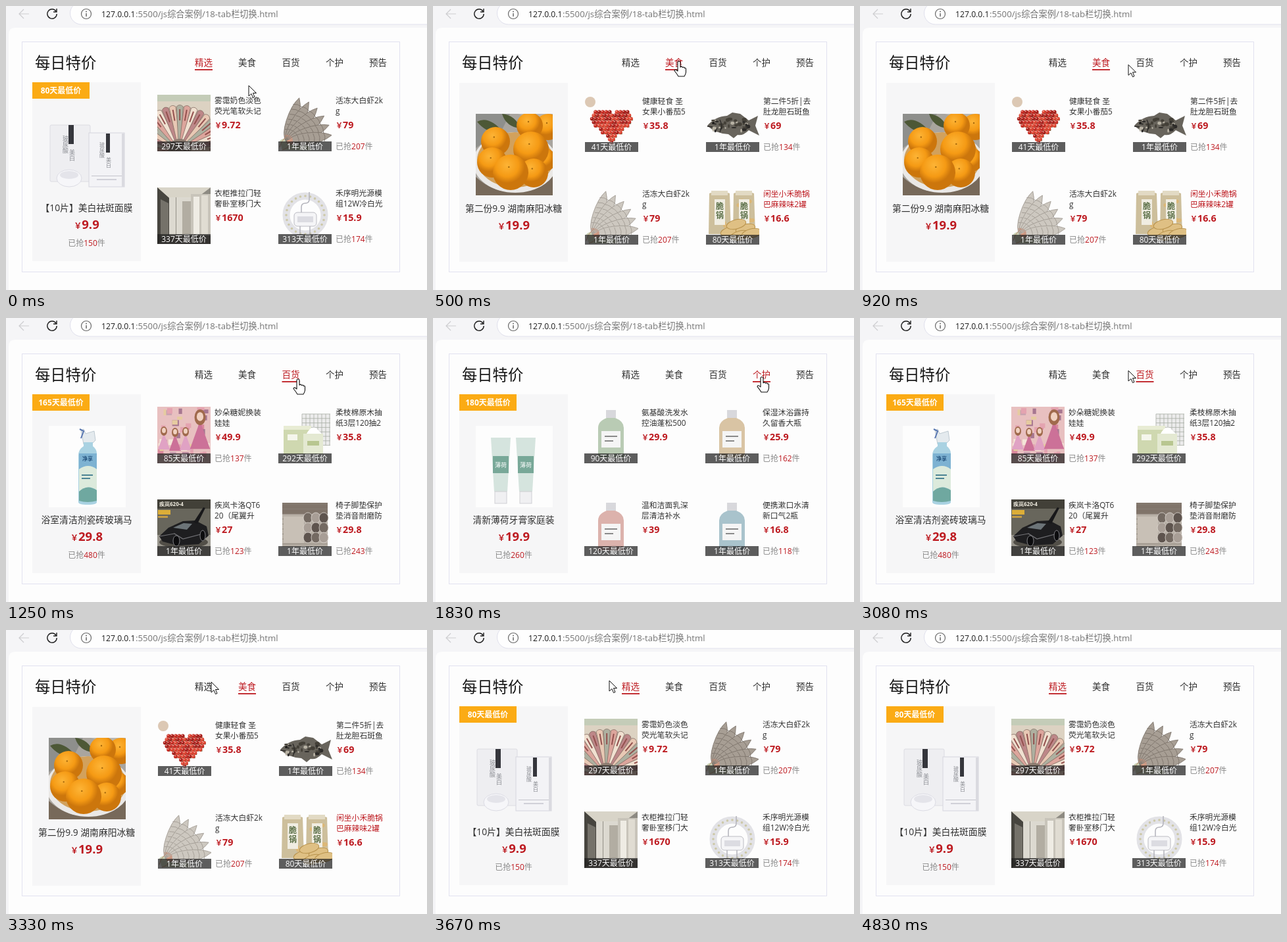
Write an HTML page that moves like this. It is 640 px wide and 432 px high and loops after 4910 ms.

```html
<!DOCTYPE html>
<html lang="zh-CN">
<head>
<meta charset="utf-8">
<title>每日特价</title>
<style>
html, body { margin: 0; width: 100%; height: 100%; overflow: hidden; background: #fdfdfd; }
#stage { display: block; width: 640px; height: 432px; font-family: "Open Sans", "Noto Sans CJK SC", sans-serif; }
</style>
</head>
<body>
<svg id="stage" viewBox="0 0 640 432" xmlns="http://www.w3.org/2000/svg"></svg>
<script>
const RED = '#bd1a20', DARK = '#303030', GRAY = '#8a8a8a', PAPER = '#fdfdfd';
const LOOP = 4910, STEP = 250 / 3;

const rect = (x, y, w, h, fill, more = '') => `<rect x="${x}" y="${y}" width="${w}" height="${h}" fill="${fill}" ${more}/>`;
const oval = (x, y, rx, ry, fill, more = '') => `<ellipse cx="${x}" cy="${y}" rx="${rx}" ry="${ry}" fill="${fill}" ${more}/>`;
const dot = (x, y, r, fill, more) => oval(x, y, r, r, fill, more);
const path = (d, fill, more = '') => `<path d="${d}" fill="${fill}" ${more}/>`;
const line = (d, color, w = 1) => path(d, 'none', `stroke="${color}" stroke-width="${w}"`);
const text = (x, y, s, size, fill, more = '') => `<text x="${x}" y="${y}" font-size="${size}" fill="${fill}" ${more}>${s}</text>`;
const mid = 'text-anchor="middle"', bold = 'font-weight="700"';
const times = (n, f) => Array.from({ length: n }, (_, i) => f(i)).join('');
const turn = (a, x, y) => `transform="rotate(${a} ${x} ${y})"`;
const small = () => rect(0, 0, 81, 86, PAPER);
const large = () => rect(0, 0, 117, 124, PAPER);

let seed = 7;
const rnd = () => (seed = seed * 16807 % 2147483647) / 2147483647;
const pick = list => list[Math.floor(rnd() * list.length)];

/* Large pictures, 117 x 124 */
const upright = (x, y, s, size) => [...s].map((c, i) => text(x, y + i * size, c, size, '#8b8d93')).join('');
const masks = () =>
  rect(2, 17, 61, 86, '#eeeef1', 'rx="2" stroke="#dcdce2"') + rect(30, 17, 8, 29, '#35363c') +
  upright(21, 41, '玻尿酸', 9) + upright(31, 62, '美白', 9) +
  rect(61, 29, 54, 82, '#f3f3f6', 'stroke="#d6d6de"') + rect(111, 30, 4, 81, '#dadae0') +
  rect(87, 30, 6, 29, '#35363c') + upright(77, 50, '玻尿酸', 8) + upright(87, 73, '美白', 8) +
  rect(65, 94, 46, 1, '#c4c4cc') + rect(73, 99, 30, 2, '#d0d0d8') +
  oval(31, 98, 19, 13, '#f6f6f9', 'stroke="#dcdce4"') + oval(31, 93, 14, 6, '#e4e4ea');

const fruit = () => rect(0, 0, 117, 124, '#a9a59f') +
  path('M0 0H52L40 24 0 52Z', '#8e8f8c') + path('M64 0H117V10L88 8Z', '#b9b6b0') +
  path('M2 12Q20 2 42 28 18 32 2 12ZM40 0Q60 2 68 22 46 20 40 0Z', '#4d5836') +
  path('M0 124V96Q28 122 66 119 104 114 117 88V124Z', '#77695a') +
  oval(60, 74, 64, 46, '#eae8e6') + oval(60, 70, 58, 42, '#d2a15c') +
  [[110, 20, 20], [82, 18, 20], [30, 42, 22], [104, 70, 18], [84, 54, 27], [25, 74, 23], [88, 90, 22], [53, 89, 27]]
    .map(([x, y, r]) => dot(x, y, r, 'url(#orange)') + dot(x - r * .1, y - r * .3, 1.2, '#a5680c')).join('');

const spray = () => large() +
  path('M49 7L53 5 56 12 69 8 71 22 65 28H53L51 17Z', '#e4eaee', 'stroke="#b2bfc8" stroke-width=".8"') +
  line('M47 5L53 8 49 19', '#5876b0', 2) +
  path('M53 25H67V31Q74 36 73 45V116Q73 120 59 120T45 116V45Q45 36 53 31Z', '#a9d2e2') +
  rect(46, 42, 27, 26, '#7db2d2') + path('M46 66Q60 56 73 66V98Q60 88 46 100Z', '#dceadc') +
  path('M46 100Q58 88 73 98V114Q59 118 46 114Z', '#6fa8a0') +
  text(59, 53, '净享', 8, '#22507c', mid + ' ' + bold) + rect(50, 74, 17, 2, '#4c8494') + rect(50, 79, 13, 2, '#4c8494');

const wine = () => large() + [46, 71].map(x =>
  path(`M${x - 5} 2h10v32q5 7 5 16v69q0 3 -10 3t-10 -3v-69q0-9 5-16Z`, '#1d1214') +
  rect(x - 5, 2, 10, 24, '#2c1a1c') + rect(x - 5, 25, 10, 2, '#8c7862') +
  rect(x - 9, 60, 18, 50, '#5d4840') + rect(x - 9, 60, 18, 2, '#a58c70') + dot(x, 70, 4, '#8f775c') +
  rect(x - 6, 80, 12, 2, '#b59c7c') + rect(x - 6, 85, 12, 1, '#b59c7c') + rect(x - 9, 102, 18, 3, '#8a7054')).join('');

const tube = () => large() + [38, 76].map(x =>
  path(`M${x - 15} 18H${x + 15}L${x + 10} 100H${x - 10}Z`, '#d5e4de') + rect(x - 12, 46, 24, 26, '#78a898') +
  text(x, 63, '薄荷', 9, '#fff', mid) + rect(x - 9, 100, 18, 18, '#f0f0f2', 'stroke="#cfcfd4"')).join('');

/* Small pictures, 81 x 86 */
const pens = () => rect(0, 0, 81, 86, '#dcd2c2') + rect(0, 0, 81, 10, '#c4ccb8') +
  times(19, i => {
    const c = ['#dca59c', '#f0e0d0', '#bd8788', '#e8c8b4', '#aeb0a0'][i % 5];
    return `<g ${turn(-88 + i * 9.8, 34, 84)}>` + path('M32.5 84L29 18Q34 13 39 18L35.5 84Z', c, 'stroke="#806a60" stroke-width=".7"') +
      rect(33, 22, 2, 17, '#94504e') + '</g>';
  }) + dot(34, 84, 17, '#8c7c70');

const shrimp = (body, edge) => () => small() + path('M2 70Q14 60 40 72L52 84H6Z', '#c9d2b4') +
  times(6, i => `<g transform="rotate(${-72 + i * 13} 12 72)">` +
    path('M12 72Q20 62 44 62T82 70Q66 80 42 80T12 72Z', body, `stroke="${edge}" stroke-width=".8"`) +
    times(6, j => line(`M${30 + j * 8} 64q3 7 0 14`, edge, .8)) + path('M12 72L22 66V77Z', '#c99884') + '</g>') +
  line('M14 62Q4 70 2 80M22 72Q14 82 6 84', '#c08a70') + dot(16, 72, 3, '#dd9c80');

const wardrobe = () => rect(0, 0, 81, 86, '#8d8a82') + path('M0 0H81L60 16H18Z', '#d8d4c8') +
  path('M0 0L18 16V86H0Z', '#47453f') + path('M5 18L17 24V72L5 78Z', '#75726a') +
  rect(18, 15, 33, 58, '#dcd9d0') + rect(28, 15, 1, 58, '#949088') + rect(38, 21, 13, 50, '#b2ada2') +
  rect(51, 10, 30, 64, '#c8c4ba') + rect(55, 14, 9, 58, '#efece4') + rect(67, 12, 10, 60, '#e0dcd2') +
  path('M18 73H81V86H0Z', '#67635a');

const lamp = () => small() + dot(41, 42, 29, 'none', 'stroke="#e2e2e6" stroke-width="11"') +
  times(24, i => dot(41 + 29 * Math.cos(i * Math.PI / 12), 42 + 29 * Math.sin(i * Math.PI / 12), 1.8, '#cdc9a8')) +
  rect(24, 38, 34, 21, '#f5f5f7', 'rx="5" stroke="#bbbbc2"') + rect(29, 44, 24, 9, '#dcdce2') +
  line('M35 38V30Q35 24 41 24T47 18V7M33 59V72M48 59V72', '#b2b2ba', 1.5);

const inHeart = (u, v) => Math.hypot(u - .47, v - .4) < .53 || (v < .35 && u < (v + 1) * .74);
const heart = () => {
  let s = small() + dot(8, 10, 8, '#dcc8b4');
  for (let r = 0; r < 11; r++) for (let c = 0; c < 13; c++) {
    const x = 8 + c * 5.4 + r % 2 * 2.7, y = 20 + r * 5.2;
    if (inHeart(Math.abs(x - 41) / 32, (46 - y) / 27))
      s += dot(x, y, 2.9, pick(['#c62a22', '#dc4432', '#a81f1c'])) + dot(x - .8, y - 1, .9, '#f4b4a4') + dot(x + 2, y + 2, .8, '#5c5a34');
  }
  return s;
};

const fish = () => small() +
  path('M2 46Q14 32 32 31L40 26 52 28 65 38 79 31 75 46 81 61 65 53Q56 62 48 60L42 65 34 59Q14 58 2 46Z', '#68645c') +
  times(38, () => { const x = 10 + rnd() * 54; return oval(x, 36 + rnd() * 18, 1 + rnd() * 3, 1 + rnd() * 2, pick(['#2c2a28', '#b8b2a4', '#444038'])); }) +
  dot(11, 42, 2, '#1c1a18') + line('M2 47L10 48M21 37Q26 46 21 56', '#2c2a28', 1.4);

const crisps = () => small() + [5, 42].map(x =>
  path(`M${x} 8Q${x + 15} 1 ${x + 31} 8L${x + 33} 70H${x - 1}Z`, '#cdbf9c') + rect(x + 3, 4, 25, 7, '#e2dac4') +
  times(8, () => oval(x + 3 + rnd() * 26, 16 + rnd() * 42, 4, 3, '#dcb878')) +
  rect(x + 8, 17, 16, 39, '#f0ede2') + text(x + 16, 32, '脆', 12, '#5c7048', mid + ' ' + bold) + text(x + 16, 46, '锅', 12, '#5c7048', mid + ' ' + bold)).join('') +
  [[37, 66], [60, 62], [52, 72], [69, 69], [46, 55]].map(([x, y]) => oval(x, y, 15, 7, '#dfc084', `stroke="#b8924c" ${turn(-14, x, y)}`)).join('');

const dolls = () => rect(0, 0, 81, 86, '#e8c0c0') +
  times(42, () => rect(rnd() * 76, rnd() * 80, 4 + rnd() * 7, 3 + rnd() * 7, pick(['#d9879c', '#f4e5d8', '#c8a2b0', '#e4a3b0', '#a77790', '#e6cba0']))) +
  [[10, 36], [27, 38], [43, 37], [65, 15]].map(([x, y], i) => {
    const k = i === 3 ? 1.7 : 1;
    return path(`M${x} ${y + 4 * k}L${x + 9 * k} ${y + 29 * k}H${x - 9 * k}Z`, i % 2 ? '#cc7198' : '#e0a2c4') + oval(x, y + 1, 5 * k, 7 * k, '#a06a4c') + oval(x, y, 3 * k, 4 * k, '#f0d1c0');
  }).join('');

const tissue = () => small() + rect(36, 11, 43, 48, '#ececec') +
  times(8, i => line(`M${36 + i * 6} 11V59M36 ${11 + i * 6.8}H79`, '#a8aca4', .8)) +
  rect(8, 29, 42, 43, '#cfd8b0') + rect(8, 29, 42, 6, '#e8ecd4') + rect(14, 42, 15, 9, '#f5f6ec') +
  rect(38, 41, 30, 31, '#e4e9d2') + path('M43 41Q50 28 58 33L66 41Z', '#fff') + rect(44, 52, 18, 7, '#b8c690');

const car = () => rect(0, 0, 81, 86, '#68665c') + rect(0, 0, 81, 14, '#424038') +
  text(3, 10, '疾岚620-4', 8, '#f0ece0', bold) + rect(1, 16, 19, 7, '#dcae38') + rect(1, 25, 15, 3, '#c49c44') +
  rect(0, 54, 81, 32, '#98958c') + oval(40, 65, 37, 9, '#524f48') +
  path('M3 56L17 43 39 33 58 32 75 41 78 55 63 68 31 70 8 64Z', '#1e1e20') + path('M24 43L40 36 53 37 45 46Z', '#6c7478') +
  path('M55 35L70 12 73 13 61 37Z', '#18181a') + line('M4 56L26 52 39 60 70 52', '#747478', 1.2) +
  oval(29, 63, 5, 8, '#0c0c0e', 'stroke="#808084"') + oval(69, 55, 4, 8, '#0c0c0e', 'stroke="#808084"');

const pads = () => small() + rect(6, 5, 69, 67, '#b8b0a6') + rect(6, 5, 69, 17, '#80746a') +
  times(9, i => line(`M6 ${7 + i * 7.6}H75`, '#8a8078', .8)) + rect(8, 26, 31, 40, '#c8c0b6') +
  times(3, r => times(3, c => oval(45 + c * 12, 28 + r * 15, 7, 8, ['#746a62', '#a89e96', '#5e544e'][(r + c) % 3], 'stroke="#dfd9d2" stroke-width=".8"')));

const drone = () => small() + oval(40, 26, 37, 20, '#cfe6f4', 'stroke="#2b7fc0" stroke-width="2"') +
  times(9, i => line(`M40 26L${40 + 36 * Math.cos(i * .7)} ${26 + 19 * Math.sin(i * .7)}`, '#4b9cd4', 1.5)) +
  [[20, 18], [60, 18], [20, 34], [60, 34]].map(([x, y]) => oval(x, y, 14, 8, '#8cc4e8', 'stroke="#2474b4" stroke-width="2"') + line(`M${x - 13} ${y}H${x + 13}`, '#1c4c78')).join('') +
  oval(40, 26, 10, 8, '#2c88c8') + oval(40, 24, 6, 4, '#8cd0f4') + line('M6 36Q40 62 74 36M8 34Q40 52 72 34', '#2b7fc0', 1.5) +
  path('M0 72L18 67Q31 60 38 64L64 68Q70 72 60 72L42 72 67 76Q64 80 40 82L15 84 0 86Z', '#dcb0a0') + line('M21 70L45 72', '#b4826c');

const cognac = () => small() + path('M1 17L25 13 26 73 2 76Z', '#cda054') + path('M25 13H79L81 74H26Z', '#dcb46c') +
  rect(6, 25, 14, 42, '#b58440') + path('M62 17L79 14V72L62 70Z', '#b98844') +
  rect(47, 14, 9, 19, '#b07430') + path('M47 30Q28 38 28 54T38 72H65Q76 65 75 50T56 30Z', '#9c3f1c') +
  oval(51, 51, 13, 11, '#dcb474') + oval(51, 51, 9, 7, '#b83c24') + rect(44, 50, 14, 2, '#f0d49c') +
  path('M57 66H76L73 79H60Z', '#efe6d4', 'stroke="#b49d7c"') + rect(60, 71, 13, 7, '#c88838');

const watch = () => rect(0, 0, 81, 86, '#a3a3a6') + path('M0 0H81V36L36 9 0 32Z', '#68686c') + path('M0 30L55 86H0Z', '#5c5c60') +
  path('M0 44L24 24 64 73 50 86H37Z', '#c8a694') +
  path('M17 68L31 30 45 10 66 19 72 56 52 70 35 86Z', '#242426') + dot(44, 39, 25, '#141416', 'stroke="#505054" stroke-width="2"') +
  dot(44, 39, 19, '#24484e') + path('M30 52L56 25 63 35 43 58Z', '#7cb4b8') + path('M29 50L48 36 34 57Z', '#d47840') + rect(68, 34, 4, 8, '#404044');

const brandy = () => small() + rect(5, 10, 37, 69, '#caa05c') + rect(5, 10, 32, 69, '#262220') +
  rect(9, 38, 25, 30, '#cca45c') + rect(13, 44, 17, 2, '#6b4e24') + rect(13, 50, 17, 7, '#e4cc94') + dot(21, 25, 6, '#a08048') +
  rect(56, 7, 11, 11, '#342420') + rect(57, 18, 9, 20, '#b06c30') + path('M57 36Q44 47 42 76Q43 82 60 81T77 75Q75 47 66 36Z', '#903c18') +
  path('M50 51H70L73 69H47Z', '#d8ac68') + text(60, 64, 'XO', 9, '#5c2c14', mid + ' ' + bold);

const care = color => () => small() + rect(33, 5, 15, 12, '#d8d8dc') +
  path('M34 17H47Q60 22 60 32V78H21V32Q21 22 34 17Z', color) + rect(26, 37, 29, 25, '#f5f5f5') + rect(31, 44, 19, 2, GRAY) + rect(31, 51, 13, 2, GRAY);

/* item: picture, two title lines, price, strip, sold */
const tabs = [
  { name: '精选', x: 287, badge: '80天最低价', art: masks, title: '【10片】美白祛斑面膜', price: '9.9', sold: 150, items: [
    [pens, '雾霭奶色淡色', '荧光笔软头记', '9.72', '297天最低价'],
    [shrimp('#a79e94', '#7c736a'), '活冻大白虾2k', 'g', '79', '1年最低价', 207],
    [wardrobe, '衣柜推拉门轻', '奢卧室移门大', '1670', '337天最低价'],
    [lamp, '禾序明光源模', '组12W冷白光', '15.9', '313天最低价', 174]] },
  { name: '美食', x: 353, off: 1, art: fruit, title: '第二份9.9 湖南麻阳冰糖', price: '19.9', items: [
    [heart, '健康轻食 圣', '女果小番茄5', '35.8', '41天最低价'],
    [fish, '第二件5折|去', '肚龙胆石斑鱼', '69', '1年最低价', 134],
    [shrimp('#cdc8c0', '#a09a92'), '活冻大白虾2k', 'g', '79', '1年最低价', 207],
    [crisps, '闲坐小禾脆锅', '巴麻辣味2罐', '16.6', '80天最低价', 0, RED]] },
  { name: '百货', x: 419.5, badge: '165天最低价', art: spray, title: '浴室清洁剂瓷砖玻璃马', price: '29.8', sold: 480, items: [
    [dolls, '妙朵糖妮换装', '娃娃', '49.9', '85天最低价', 137],
    [tissue, '柔枝棉原木抽', '纸3层120抽2', '35.8', '292天最低价'],
    [car, '疾岚卡洛QT6', '20（尾翼升', '27', '1年最低价', 123],
    [pads, '椅子脚垫保护', '垫消音耐磨防', '29.8', '1年最低价', 243]] },
  { name: '个护', x: 486, badge: '180天最低价', art: tube, title: '清新薄荷牙膏家庭装', price: '19.9', sold: 260, items: [
    [care('#b9cbb4'), '氨基酸洗发水', '控油蓬松500', '29.9', '90天最低价'],
    [care('#d9c4a4'), '保湿沐浴露持', '久留香大瓶', '25.9', '1年最低价', 162],
    [care('#dcb2ac'), '温和洁面乳深', '层清洁补水', '39', '120天最低价'],
    [care('#a9c3cc'), '便携漱口水清', '新口气2瓶', '16.8', '1年最低价', 118]] },
  { name: '预告', x: 552, art: wine, title: 'VORELINA白兰地6年/8', price: '208', items: [
    [drone, '感应飞行玩具', '四轴迷你飞机', '49.7'],
    [cognac, '买一瓶 送一', '瓶 罗曼珂伯', '79'],
    [watch, '智能手表男运', '动多功能计步', '98'],
    [brandy, '玉盏XO白兰', '地', '99']] }
];

const price = (x, y, n, size, yen, more = '') =>
  text(x, y, `<tspan font-size="${yen}">￥</tspan>${n}`, size, RED, bold + ' ' + more);
const soldLine = (x, y, n, more) => n ? text(x, y, `已抢<tspan fill="${RED}">${n}</tspan>件`, 12, GRAY, more) : '';
const picture = (x, y, w, h, art) => `<svg x="${x}" y="${y}" width="${w}" height="${h}">${art()}</svg>`;

function card([art, a, b, cost, strip, sold, color = DARK], i) {
  const x = 230 + i % 2 * 184, y = 135 + (i >> 1) * 141;
  return picture(x, y, 81, 86, art) +
    (strip ? rect(x, y + 71, 81, 15, '#202020', 'opacity=".72"') + text(x + 40.5, y + 83, strip, 12, '#fff', mid) : '') +
    text(x + 87, y + 13, a, 11.8, color) + text(x + 87, y + 29, b, 11.8, color) +
    price(x + 87, y + 51, cost, 14.3, 11) + soldLine(x + 87, y + 83, sold);
}

function page(tab) {
  const d = tab.off || 0;
  return `<g class="page" visibility="hidden">` +
    `<g transform="translate(0 ${d})">` + rect(40, 116, 165, 272, '#f6f6f7') +
    (tab.badge ? rect(40, 116, 87, 25, '#fbab14') + text(83.5, 133, tab.badge, 12, '#fff', mid + ' ' + bold) : '') +
    picture(65, 164 - d, 117, 124, tab.art) +
    text(122.5, 312, tab.title, 13.8, DARK, mid) + price(122.5, 339, tab.price, 18.5, 12, mid) + soldLine(122.5, 365, tab.sold, mid) + '</g>' +
    `<g transform="translate(${d} ${d})">${tab.items.map(card).join('')}</g>` +
    rect(tab.x, 96, 27, 1.8, RED) + text(tab.x, 91, tab.name, 13.5, RED) + '</g>';
}

const chrome =
  rect(0, 0, 640, 432, '#f5f5f7') + path('M4 432V43Q4 33 14 33H640V432Z', PAPER) +
  rect(97.5, -6, 600, 34, '#fefefe', 'rx="17" stroke="#e0e0ec"') +
  line('M35 12H20M27 5L20 12 27 19', '#cdcdd0', 1.2) +
  line('M76 8A7.2 7.2 0 1 0 77.2 12M77 4V9H72', '#202020', 1.4) +
  dot(122, 12, 7.5, 'none', 'stroke="#6a6a6a" stroke-width="1.2"') + rect(121.3, 11, 1.5, 5, '#6a6a6a') + dot(122, 8.5, 1, '#6a6a6a') +
  text(145, 17, '127.0.0.1', 12.2, '#1c1c1c') + text(197, 17, ':5500/js综合案例/18-tab栏切换.html', 13.2, '#747474') +
  rect(24.5, 54.5, 574, 350, 'none', 'stroke="#e2e2f0"') + text(44, 95, '每日特价', 23.3, '#141414');

const arrow = path('M0 0V16L4 12.5 6.6 18.5 9 17.4 6.5 11.5H11.5Z', '#fff', 'stroke="#111" stroke-width="1" id="arrow"');
const hand = path('M-2 2Q-2 0 0 0T2 2V9Q4 7 5.5 9.5 7.5 8 8.5 10.5 10.5 9.5 10.5 12V17Q10 20 8 23H-1Q-4 18 -7 14.5 -6 11 -2 15Z',
  '#fff', 'stroke="#111" stroke-width="1.1" stroke-linejoin="round" id="hand"');

const stage = document.getElementById('stage');
stage.innerHTML = '<defs><radialGradient id="orange" cx=".4" cy=".3"><stop offset="0" stop-color="#fdb436"/><stop offset=".65" stop-color="#f59a14"/><stop offset="1" stop-color="#cc760c"/></radialGradient></defs>' +
  chrome + tabs.map(t => `<g class="tab">${text(t.x, 91, t.name, 13.5, DARK)}</g>`).join('') +
  tabs.map(page).join('') + `<g id="pointer">${arrow}${hand}</g>`;

const all = s => [...stage.querySelectorAll(s)];
const pages = all('.page'), labels = all('.tab');
const [pointer, arrowEl, handEl] = ['#pointer', '#arrow', '#hand'].map(s => stage.querySelector(s));
const show = (el, on) => el.setAttribute('visibility', on ? 'visible' : 'hidden');

// step, tab
const switches = [[0, 0], [3, 1], [12, 2], [19, 3], [29, 4], [33, 3], [36, 2], [38, 1], [41, 0]];
// step, x, y, hand shape from here on
const track = [[0, 369, 121, 0], [3, 372, 96, 1], [6, 374, 84, 1], [9, 382, 86, 0], [12, 421, 91, 1],
  [15, 444, 93, 1], [17, 458, 92, 0], [19, 488, 91, 1], [24, 508, 89, 1], [26, 530, 87, 0], [28, 568, 86, 1], [30, 576, 86, 1],
  [31, 570, 85, 1], [32, 540, 84, 0], [33, 510, 83, 1], [35, 462, 82, 0], [36, 438, 81, 1], [37, 408, 80, 0], [38, 376, 80, 1],
  [39, 342, 79, 0], [40, 312, 79, 0], [41, 298, 78, 1], [43, 276, 77, 0], [44, 268, 77, 0], [49, 46, 9, 0], [51, -20, -20, 0], [59, -20, -20, 0]];

function draw(t) {
  const k = Math.floor((t + 4) / STEP);
  const active = switches.filter(s => s[0] <= k).pop()[1];
  pages.forEach((p, i) => show(p, i === active));
  labels.forEach((l, i) => show(l, i !== active));
  const n = track.findIndex(p => p[0] > k), a = track[n - 1], b = track[n];
  const f = (k - a[0]) / (b[0] - a[0]);
  const at = i => a[i] + (b[i] - a[i]) * f;
  pointer.setAttribute('transform', `translate(${at(1)} ${at(2)})`);
  show(arrowEl, !a[3]);
  show(handEl, a[3]);
}

const start = performance.now();
function tick() {
  draw((performance.now() - start) % LOOP);
  requestAnimationFrame(tick);
}
draw(0);
requestAnimationFrame(tick);
</script>
</body>
</html>
```
